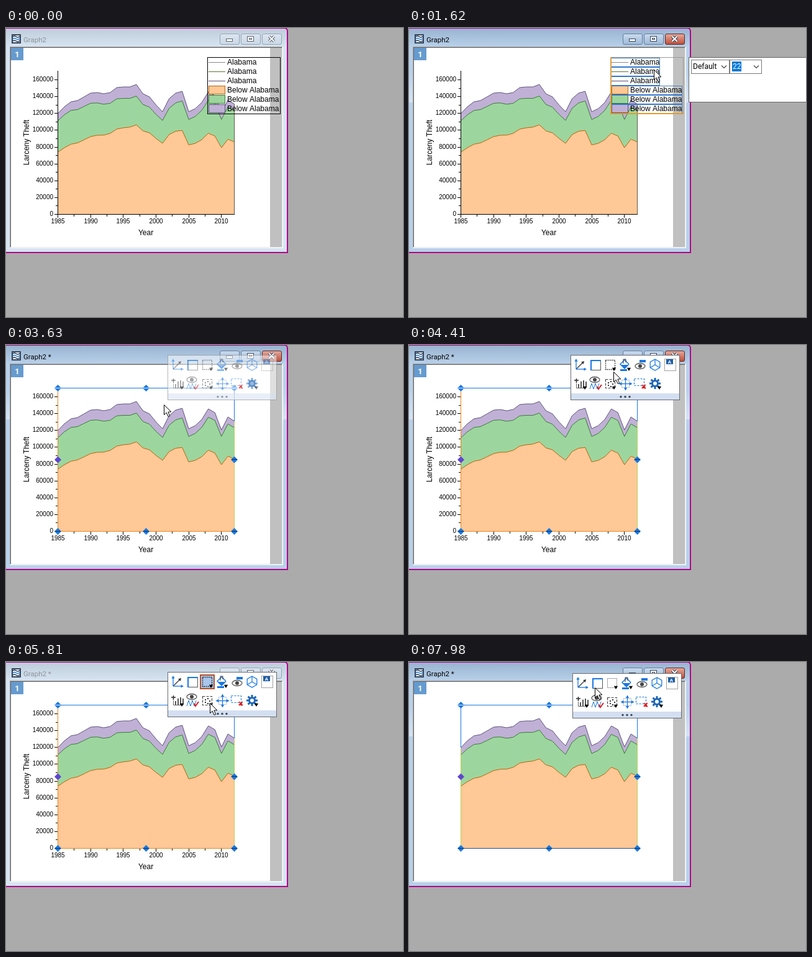
An HTML page with a canvas that plays this animation: 639 px wide and 466 px high, repeating every 8000 ms.

```html
<!DOCTYPE html>
<html lang="en">
<head>
<meta charset="utf-8">
<title>Stacked area chart editing</title>
<style>
html, body { margin: 0; width: 100%; height: 100%; overflow: hidden; background: #ababab; }
canvas { display: block; }
</style>
</head>
<body>
<canvas id="stage" width="639" height="466"></canvas>
<script>
const ctx = document.getElementById('stage').getContext('2d');
const LOOP = 8000, STEP = 78;
const BLUE = '#1a78e0', INK = '#333', RED = '#e02020';
const SANS = '"Liberation Sans", Arial, sans-serif';
const UI = 'Roboto, "Open Sans", sans-serif';

const LEFT = 83, RIGHT = 367, TOP = 69, BASE = 300, YEAR = 10.53;
const YEARS = 28, LAST = YEARS - 1;

// Total height per year; the bands are slowly changing shares of it
const totals = [
  162, 173, 181, 183, 189, 195, 196, 194, 196, 204, 205, 205, 209, 194,
  189, 176, 165, 186, 195, 198, 165, 170, 180, 197, 191, 163, 184, 177
];
const layers = [
  { fill: '#c0b0d6', line: '#5c5478', share: () => 1 },
  { fill: '#9cd69e', line: '#3c7a38', share: i => .928 - .018 * Math.sin(i * .145) },
  { fill: '#ffc896', line: '#b8640c', share: i => .616 + .0015 * i + .056 * Math.sin(Math.PI * i / LAST) ** 2 }
];

// Pointer moves: start, end, where it arrives
const ENTRY = { x: 535, y: 353 };
const moves = [
  { from: 300, to: 1080, x: 394, y: 67 },
  { from: 2020, to: 2710, x: 289, y: 110 },
  { from: 2790, to: 3170, x: 254, y: 96 },
  { from: 4030, to: 4410, x: 329, y: 43 },
  { from: 4820, to: 5350, x: 328, y: 66 },
  { from: 5900, to: 6130, x: 442, y: 247 },
  { from: 6510, to: 6900, x: 257, y: 98 },
  { from: 7520, to: 7980, x: 299, y: 41 }
];

function box(x, y, w, h, color) {
  ctx.fillStyle = color;
  ctx.fillRect(x, y, w, h);
}

function frame(x, y, w, h, color, width = 1, dash = []) {
  ctx.setLineDash(dash);
  ctx.strokeStyle = color;
  ctx.lineWidth = width;
  ctx.strokeRect(x + .5, y + .5, w - 1, h - 1);
  ctx.setLineDash([]);
}

function path(points, close) {
  ctx.beginPath();
  for (const [x, y] of points) ctx.lineTo(x, y);
  if (close) ctx.closePath();
}

function line(points, color, width = 1) {
  path(points);
  ctx.strokeStyle = color;
  ctx.lineWidth = width;
  ctx.stroke();
}

function shape(points, fill) {
  path(points, true);
  ctx.fillStyle = fill;
  ctx.fill();
}

// Corners of a regular polygon, the first one pointing along `turn`
function ring(x, y, r, n, turn = 0) {
  return Array.from({ length: n }, (_, i) => {
    const a = turn + i * 2 * Math.PI / n;
    return [x + r * Math.cos(a), y + r * Math.sin(a)];
  });
}

function oval(x, y, rx, ry, color, fill) {
  ctx.beginPath();
  ctx.ellipse(x, y, rx, ry, 0, 0, 7);
  ctx.fillStyle = ctx.strokeStyle = color;
  fill ? ctx.fill() : ctx.stroke();
}

function text(s, x, y, font, color = '#000', align = 'left') {
  ctx.font = font;
  ctx.fillStyle = color;
  ctx.textAlign = align;
  ctx.fillText(s, x, y);
}

function fade(y0, y1, a, b) {
  const g = ctx.createLinearGradient(0, y0, 0, y1);
  g.addColorStop(0, a);
  g.addColorStop(1, b);
  return g;
}

function cross(x, y, r, color, width) {
  for (const s of [-1, 1]) line([[x - r, y - s * r], [x + r, y + s * r]], color, width);
}

function captionButton(x, [light, dark, edge]) {
  ctx.beginPath();
  ctx.roundRect(x + .5, 9.5, 31, 17, 2.5);
  ctx.fillStyle = fade(9, 27, light, dark);
  ctx.fill();
  ctx.strokeStyle = edge;
  ctx.lineWidth = 1;
  ctx.stroke();
}

function drawCaption(active, title) {
  box(9, 10, 15, 15, '#33455c');
  box(11, 12, 11, 11, '#fff');
  for (let i = 0; i < 3; i++) {
    const wave = Array.from({ length: 12 }, (_, k) => [11 + k, 14 + i * 3.5 - Math.sin(k * .6)]);
    line(wave, i === 1 ? BLUE : '#263a56', 1.5);
  }
  text(title, 28, 23, '11.5px ' + UI, active ? '#000' : '#8d9399');

  const glyph = active ? '#34465e' : '#5b6470';
  const cool = active ? ['#cbdcef', '#9db8d6', '#647d9b'] : ['#dce6f1', '#cad7e5', '#98a5b3'];
  const close = active ? ['#e8ad9f', '#bd4a35', '#5a2a2a'] : cool;
  [cool, cool, close].forEach((skin, i) => captionButton(344 + 34 * i, skin));
  box(354, 17, 11, 5, glyph);
  box(355, 18, 9, 3, '#fff');
  box(388, 13, 11, 9, glyph);
  box(389, 14, 9, 7, '#fff');
  frame(391, 16, 5, 3, glyph);
  cross(427.5, 17.5, 4, glyph, 4.5);
  cross(427.5, 17.5, 4, '#fff', 2.2);
}

function drawWindow(active, title) {
  box(0, 0, 639, 466, '#ababab');
  const skin = active ? '#b9d1ea' : '#d7e4f2';
  ctx.beginPath();
  ctx.roundRect(-10, 0, 463, 362, [0, 5, 0, 0]);
  ctx.fillStyle = skin;
  ctx.fill();
  ctx.save();
  ctx.clip();
  box(0, 0, 453, 31, fade(1, 31, active ? '#99b4d1' : '#bfcddb', skin));
  if (active) {
    const shine = fade(70, 120, 'rgba(255,255,255,0)', 'rgba(255,255,255,.4)');
    box(0, 70, 6, 50, shine);
    box(446, 70, 6, 50, shine);
  }
  ctx.restore();
  ctx.strokeStyle = '#b0008a';
  ctx.lineWidth = 2;
  ctx.stroke();
  drawCaption(active, title);

  // Sunken edge around the page
  box(6, 30, 440, 325, '#fff');
  box(6, 30, 439, 324, '#a0a0a0');
  box(7, 31, 438, 323, '#e3e3e3');
  box(7, 31, 437, 322, '#696969');
  box(8, 32, 436, 321, '#c0c0c0');
  box(8, 32, 417, 321, '#fff');
  box(8, 32, 20, 20, '#669bcf');
  text('1', 18, 47, 'bold 13px ' + UI, '#fff', 'center');
}

function drawAreas() {
  for (const { fill, line: color, share } of layers) {
    const edge = totals.map((h, i) => [LEFT + .5 + i * YEAR, BASE - h * share(i)]);
    shape([...edge, [RIGHT + .5, BASE], [LEFT + .5, BASE]], fill);
    line(edge, color);
  }
  box(LEFT, BASE, 1, -totals[0], '#5e5648');
  box(RIGHT, BASE, 1, -totals[LAST], '#5e5648');
}

function drawAxes() {
  box(LEFT, TOP, 1, BASE - TOP + 1, '#000');
  box(LEFT, BASE, RIGHT - LEFT + 1, 1, '#000');
  for (let i = 0; i <= 16; i++) {
    const y = Math.round(BASE - i * 13.56), size = i % 2 ? 3 : 5;
    box(LEFT - size, y, size, 1, '#000');
    if (i % 2 === 0) text(i * 10000, 76, y + 3, '10px ' + SANS, '#000', 'right');
  }
  for (let i = 0; i <= 10; i++) {
    const x = Math.round(LEFT + i * 2.5 * YEAR), size = i % 2 ? 3 : 5;
    box(x, BASE + 1, 1, size, '#000');
    if (i % 2 === 0) text(1985 + i * 2.5, x + .5, 315, '10px ' + SANS, '#000', 'center');
  }
  text('Year', 225, 334, '12px ' + SANS, '#000', 'center');
  ctx.save();
  ctx.translate(37, 184.5);
  ctx.rotate(-Math.PI / 2);
  text('Larceny Theft', 0, 0, '12px ' + SANS, '#000', 'center');
  ctx.restore();
}

function drawLegend(selected) {
  const strokes = ['#8a8a8a', '#55752f', '#544a70'];
  for (let i = 0; i < 6; i++) {
    const y = 48 + i * 15, area = i > 2;
    if (area) {
      const { fill, line: color } = layers[5 - i];
      box(326, y, 27, 14, fill);
      frame(326, y, 27, 14, color);
    } else {
      box(326, y + 7, 27, 1, strokes[i]);
    }
    text(area ? 'Below Alabama' : 'Alabama', 356, y + 11, '12px ' + SANS);
    if (selected) {
      frame(325, y, area ? 115 : 79, 15, '#4a7fbd');
      box(326, y + 14, area ? 113 : 77, 1, '#1670dd');
    }
  }
  frame(324, 47, 118, 92, selected ? '#9a9a9a' : '#000');
  if (selected) {
    box(324, 47, 2, 91, '#dfa044');
    box(324, 137, 118, 2, '#e59a25');
  }
}

function dropdown(x, w) {
  frame(x, 51, w, 23, '#7a7a7a');
  const mid = x + w - 9;
  line([[mid - 4, 60.5], [mid, 64.5], [mid + 4, 60.5]], '#444', 1.2);
}

function drawTextBar() {
  box(450, 47, 200, 73, '#fff');
  frame(450, 47, 200, 73, '#666');
  dropdown(454, 62);
  dropdown(516, 52);
  text('Default', 457, 66, '12px ' + UI);
  box(520, 54, 15, 16, '#0078d7');
  text('22', 521, 66, '12px ' + UI, '#fff');
}

// Selection lines invert what lies under them
function drawSelection(axes) {
  const flipped = '#e5871f', mixed = '#bbd157';
  const w = RIGHT - LEFT + 1, h = BASE - TOP;
  frame(LEFT, TOP, w, h + 1, BLUE);
  box(LEFT, BASE, 1, -totals[0], mixed);
  box(RIGHT, BASE, 1, -totals[LAST], mixed);
  if (axes) box(LEFT, TOP, 1, h, flipped);
  box(LEFT, BASE, w, 1, axes ? flipped : '#1a4f89');
  for (let i = 0; i < 9; i++) {
    if (i === 4) continue;
    const x = LEFT + (i % 3) * 142, y = TOP + Math.floor(i / 3) * 115.5;
    shape(ring(x + .5, y + .5, 5.5, 4), i === 3 ? '#6046cf' : BLUE);
    if (i < 3) box(x - 4, y, 9, 1, '#e6eefb');
    else if (i !== 3) box(x - 4, Math.floor(y), 9, 1, '#1c2f4d');
  }
}

function caret(x, y) {
  shape(ring(x, y - .5, 3.6, 3, Math.PI / 2), '#000');
}

function eye(x, y) {
  ctx.lineWidth = 1.3;
  oval(x, y, 8, 4.5, '#555');
  oval(x, y, 3, 3, '#444', true);
}

function arrow(x0, y0, x1, y1, color = BLUE) {
  line([[x0, y0], [x1, y1]], color, 1.3);
  shape(ring(x1, y1, 3, 3, Math.atan2(y1 - y0, x1 - x0)), color);
}

// Each icon is drawn around the middle of its cell
const icons = [
  function axesArrows() {
    arrow(-7, 7, 4, -4, INK);
    arrow(-7, 7, -7, -7);
    arrow(-7, 7, 7, 7);
  },
  function frameLines() {
    frame(-8, -8, 17, 17, '#555');
    box(-8, -8, 17, 2, BLUE);
    box(-8, -8, 2, 17, BLUE);
  },
  function axisFrame({ open, axes }) {
    if (open) {
      box(-12, -12, 24, 24, '#b5522c');
      box(-10, -10, 20, 20, '#a9c5ea');
    }
    if (axes) frame(-8, -8, 16, 16, '#111', 1.4, [1.6, 1.6]);
    else frame(-8, -8, 16, 16, '#aaa');
    caret(6, 7);
  },
  function bucket() {
    line(ring(-1, -1, 7, 4).concat([[6, -1]]), BLUE, 1.5);
    shape([[-7, 0], [5, 0], [-1, 6]], BLUE);
    line([[-3, -2], [-3, -9], [1, -9], [1, -4]], INK);
    box(-8, 7, 11, 3, BLUE);
    caret(6, 7);
  },
  function viewBar() {
    eye(0, 2);
    box(-1, -8, 10, 4, BLUE);
  },
  function cube() {
    const corners = ring(0, 0, 9, 6, Math.PI / 6);
    line([...corners, corners[0]], BLUE, 1.3);
    for (let i = 0; i < 6; i += 2) line([[0, 0], corners[i]], BLUE, 1.3);
  },
  function label() {
    frame(-9, -10, 19, 20, '#a0a0a0');
    box(-6, -9, 11, 8, '#1d5da8');
    text('A', -.5, -2, 'bold 8px ' + SANS, '#fff', 'center');
  },
  function bars() {
    line([[-10, -5], [-3, -5]], INK, 1.6);
    line([[-6.5, -8], [-6.5, -1]], INK, 1.6);
    line([[-6.5, 0], [-6.5, 7.5], [9, 7.5]], '#666');
    for (let i = 0; i < 4; i++) box(-4 + i * 4, 7, 2, -6 - 6 * Math.sin(i * .8), '#555');
    caret(7, 7);
  },
  function waveView() {
    eye(-1, -6);
    const wave = Array.from({ length: 6 }, (_, i) => [-9 + i * 3, i % 2 ? 0 : 9]);
    line(wave, BLUE);
    line([[3, 5], [5, 9], [10, 2]], RED, 2);
  },
  function scatter() {
    frame(-8, -7, 16, 15, '#444', 1.2, [4, 2]);
    for (const [x, y] of ring(-1, 0, 4, 5)) box(Math.round(x), Math.round(y), 2, 2, INK);
    caret(6, 7);
  },
  function move() {
    frame(-6, -6, 13, 13, '#b8c6d6');
    for (const [x, y] of ring(.5, .5, 8, 4)) arrow(.5, .5, x, y);
  },
  function region() {
    frame(-10, -8, 17, 12, BLUE, 1.2, [3, 2]);
    shape(ring(6, 6, 4, 3, .8), RED);
    cross(6, 5, 3, RED, 1.6);
  },
  function gear() {
    for (const tip of ring(0, 0, 9, 8)) line([[0, 0], tip], '#1f66b5', 3);
    oval(0, 0, 6, 6, '#1f66b5', true);
    oval(0, 0, 3, 3, '#fff', true);
    caret(7, 7);
  }
];

function drawToolbar(x, y, alpha, state) {
  ctx.save();
  ctx.translate(x, y);
  ctx.globalAlpha = alpha;
  box(0, 0, 176, 73, '#fff');
  box(1, 62, 174, 10, '#d3dff1');
  frame(0, 0, 176, 73, '#686b70');
  for (let i = 0; i < 3; i++) oval(81 + i * 7, 67.5, 1.7, 1.7, '#3d4a5c', true);
  icons.forEach((draw, i) => {
    ctx.save();
    ctx.translate(16 + (i % 7) * 24, i < 7 ? 16 : 46);
    draw(state);
    ctx.restore();
  });
  ctx.restore();
}

function pointerAt(t) {
  const n = moves.findLastIndex(m => t >= m.from);
  if (n < 0) return null;
  const a = moves[n - 1] || ENTRY, b = moves[n];
  const steps = Math.round((b.to - b.from) / STEP) + 1;
  const gap = (b.to - b.from) / (steps - 1);
  const done = Math.min(steps, Math.floor((t - b.from) / gap + .01) + 1);
  const p = 1 - (1 - done / steps) ** 2;
  return [Math.round(a.x + (b.x - a.x) * p), Math.round(a.y + (b.y - a.y) * p)];
}

function drawPointer([x, y]) {
  ctx.save();
  ctx.translate(x + .5, y + .5);
  shape([[0, 0], [0, 16], [3.7, 12.6], [6.6, 19], [9.2, 18], [6.4, 11.6], [11.3, 11.3]], '#fff');
  ctx.strokeStyle = '#000';
  ctx.lineWidth = 1;
  ctx.stroke();
  ctx.restore();
}

function render(t) {
  const during = (a, b) => t >= a && t < b;
  const axes = t < 5900;
  drawWindow(during(1160, 4650) || t >= 6280, t < 2020 ? 'Graph2' : 'Graph2 *');
  drawAreas();
  if (axes) drawAxes();
  if (t < 2020) drawLegend(t >= 1620);
  if (during(1620, 2020)) drawTextBar();
  if (during(3320, 6360) || t >= 7200) drawSelection(axes);
  if (during(3630, 6360)) drawToolbar(260, 16, t < 3710 ? .5 : 1, { axes, open: during(4570, 6280) });
  if (t >= 7520) drawToolbar(263, 18, t < 7600 ? .5 : 1, { axes, open: false });
  const pointer = pointerAt(t);
  if (pointer) drawPointer(pointer);
}

function tick() {
  render(performance.now() % LOOP);
  requestAnimationFrame(tick);
}
tick();
</script>
</body>
</html>
```
